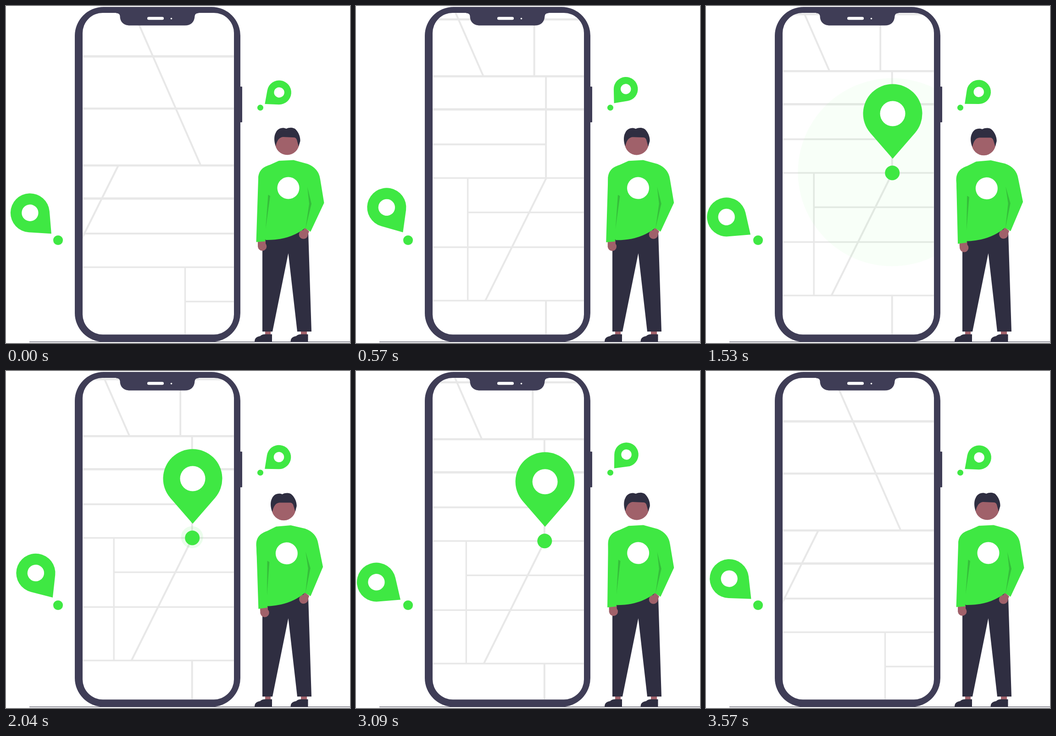
Recreate the animation shown at these times as an HTML page. Size 750x736 px, loop 3.6 s.

```html
<!DOCTYPE html>
<html lang="en">
<head>
<meta charset="utf-8">
<title>Map phone</title>
<style>
  html, body { margin: 0; height: 100%; overflow: hidden; background: #fff; }
  svg { display: block; width: 100vw; height: 100vh; }
  .green { fill: #3fe843; }
  .fold { fill: #35bf3a; }
  .dark { fill: #2f2e41; }
  .case { fill: #3f3d56; }
  .skin { fill: #a0616a; }
  .white { fill: #fff; }
  #roads { fill: none; stroke: #e8e8e8; stroke-width: 4; }
</style>
</head>
<body>
<svg viewBox="0 0 750 736">
  <defs>
    <clipPath id="screen"><rect x="167.500" y="15.500" width="329" height="701.500" rx="44"/></clipPath>
    <g id="drop">
      <path class="green" d="M0-31L-48.800-87.300A64.500 64.500 0 1 1 48.800-87.300Z"/>
      <circle class="white" cy="-129.500" r="27.500"/>
    </g>
    <circle id="dot" class="green" r="16"/>
    <path id="shoe" class="dark" d="M542 733C542 725 547 722 554 721Q558 717 564 717H580V733Z"/>
  </defs>

  <path d="M51 733.500H750" stroke="#2f2e41"/>

  <!-- Phone -->
  <rect class="case" x="150" y="2" width="361" height="731.500" rx="63"/>
  <rect class="case" x="505" y="176" width="10" height="78" rx="1"/>
  <rect class="white" x="167" y="15" width="330" height="702.500" rx="44"/>
  <g clip-path="url(#screen)">
    <g id="map">
      <g id="roads">
        <path stroke-width="5" d="M0 110H700M0 420.500H700"/>
        <path stroke-width="4.500" d="M0 224H700M0 348.300H700"/>
        <path d="M0 497H561M284 27L424.500 348M245 348L134 571"/>
        <path d="M535.500 224V348M561 348V570M561 838V940M562 570L429 838"/>
        <path stroke-width="3.500" d="M0 570.500H700M390.500 645.500H700M0 721.500H700M0 838.300H700M390.500 570V838"/>
      </g>
      <g transform="translate(561.500 570.500)">
        <circle id="pulse" class="green" cx="-.5" cy="-1.500"/>
        <use id="mapDot" href="#dot"/>
        <use id="mapDrop" href="#drop" x=".8"/>
      </g>
    </g>
  </g>
  <path class="case" d="M240 14V15.500Q248 15.500 248.500 22C248.500 35 257 42.500 270 42.500H390C403 42.500 411 35 411.500 22Q412 15.500 420 15.500V14Z"/>
  <rect class="white" x="308" y="23.700" width="36" height="6.600" rx="3.300"/>
  <circle class="white" cx="360.500" cy="27.500" r="1.800"/>

  <!-- Side pins -->
  <g transform="translate(113.500 511.500) scale(.66)"><use href="#dot"/><use id="leftDrop" href="#drop"/></g>
  <g transform="translate(554.500 222) scale(.408)"><use href="#dot"/><use id="rightDrop" href="#drop"/></g>

  <!-- Person -->
  <path class="skin" d="M565 709H577V720H565ZM643 709H656V720H643Z"/>
  <use href="#shoe"/>
  <use href="#shoe" x="78.500"/>
  <path class="dark" d="M559 500V711H581L615.500 540L635 711H666L659 494L650 480Z"/>
  <g id="torso">
    <circle class="skin" cx="613" cy="299" r="26.300"/>
    <path class="dark" d="M588 306C584 296 584 284 588 277C592 267 603 264 611 268C619 264 629 266 632 270C638 276 642 286 641.500 295L638 307L634 292Q632 287 627 287L604 286Q592 287 588 306Z"/>
    <path class="skin" d="M652 484L661 492L656 505L645 494Z"/>
    <circle class="skin" cx="648.500" cy="499" r="9.800"/>
    <path class="green" d="M595 338L627 336.500L658 345Q682 355 685 378L693.500 430L664 493L652 485Q618 512 566 511L552 480L550 378C550 358 562 351 575 347Z"/>
    <path class="fold" d="M657 395L666 432L653 486L661 432Z"/>
    <circle class="white" cx="615.500" cy="397.500" r="24"/>
    <g id="arm">
      <path class="skin" d="M549 512H566V526H549Z"/>
      <circle class="skin" cx="558.700" cy="525" r="9.600"/>
      <path class="green" d="M550 378Q550 362 563 353L582 372L574 420L565 514L545.500 515.500Z"/>
      <path class="fold" d="M571.500 412L576 415L566 487Z"/>
    </g>
  </g>
</svg>
<script>
  const LOOP = 3600;
  const el = id => document.getElementById(id);
  const clamp = u => Math.min(1, Math.max(0, u));
  const ease = u => u < .5 ? 4 * u ** 3 : 1 - 4 * (1 - u) ** 3;
  const ramp = (t, from, to) => clamp((t - from) / (to - from));
  const place = (id, value) => el(id).setAttribute('transform', value);

  // Eased back-and-forth between 0 and 1
  function swing(t, half) {
    const u = (t / half) % 2;
    return ease(u > 1 ? 2 - u : u);
  }

  function draw(t) {
    const pan = ease(ramp(t, 0, 750)) - ease(ramp(t, 2970, 3570));
    place('map', `translate(${-155.3 * pan} ${-206 * pan})`);

    const pop = 1 - (1 - ramp(t, 660, 930)) ** 3;
    place('mapDot', `scale(${pop})`);
    place('mapDrop', `scale(${pop})`);

    const age = t < 1980 ? t - 660 : t - 1980;
    const shown = age > 0 ? 1 - ramp(age, 720, 960) : 0;
    el('pulse').setAttribute('r', Math.max(0, .4055 * age - .000195 * age * age));
    el('pulse').setAttribute('opacity', .1 * shown);

    place('leftDrop', `rotate(${-54 + 21 * swing(t + 416, 900)})`);
    place('rightDrop', `rotate(${51.1 - 14.2 * swing(t, 900)})`);

    place('torso', `rotate(${-2.3 * swing(t, 1800)} 635 490)`);
    place('arm', `rotate(${-1.6 * (swing(t + LOOP - 510, 1800) - .09)} 568 365)`);
  }

  function tick() {
    draw(performance.now() % LOOP);
    requestAnimationFrame(tick);
  }
  tick();
</script>
</body>
</html>
```
